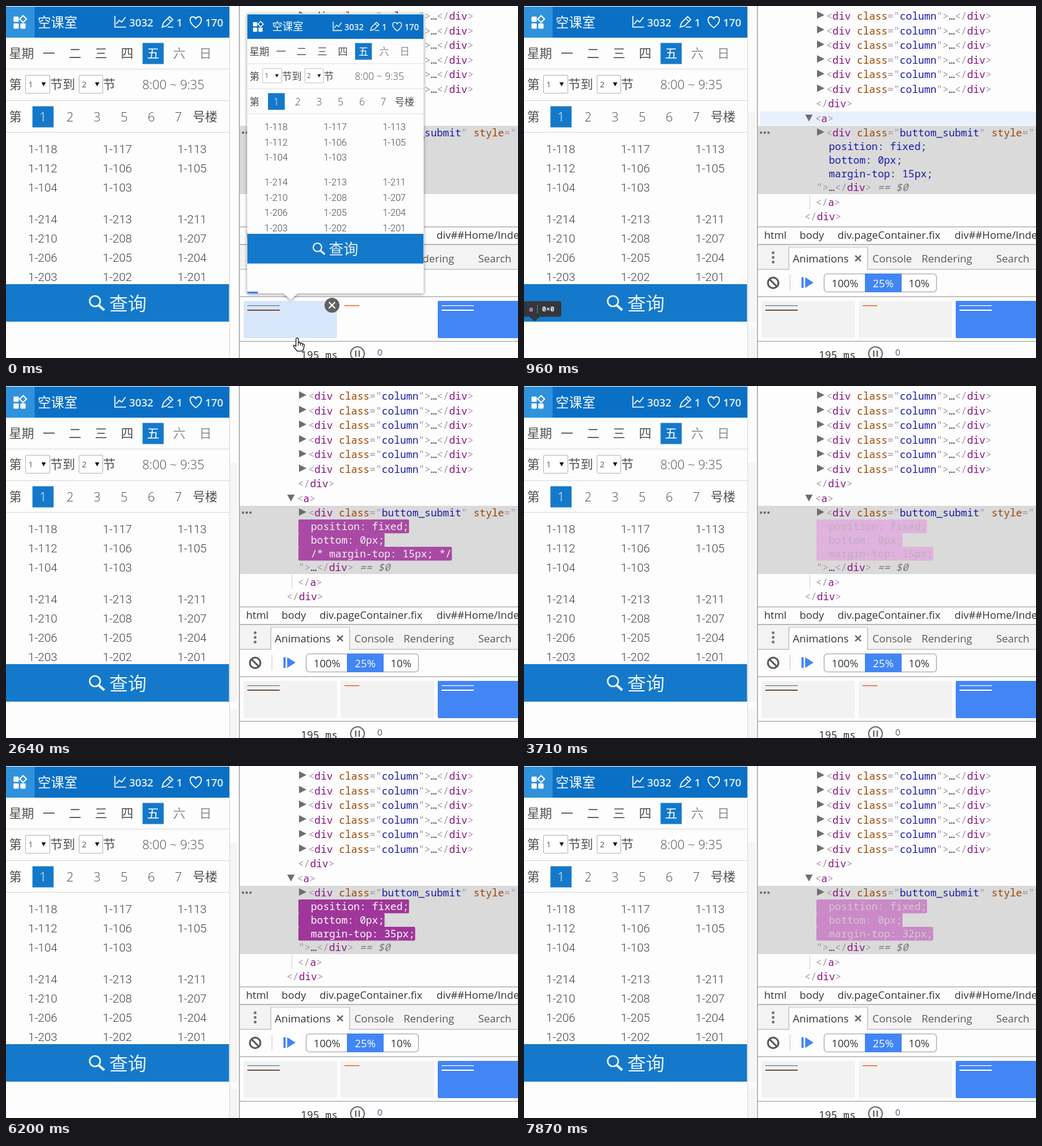
Write an HTML page with a canvas that moves like this. It is 823 by 567 pixels and loops after 7990 ms.

```html
<!DOCTYPE html>
<html lang="zh">
<head>
<meta charset="utf-8">
<title>Style editing</title>
<style>
html, body { margin: 0; width: 100%; height: 100%; overflow: hidden; background: #fff; }
canvas { display: block; }
</style>
</head>
<body>
<canvas id="stage" width="823" height="567"></canvas>
<script>
const ctx = document.getElementById('stage').getContext('2d');
const LOOP = 7990;
const UI = '"Open Sans", "Noto Sans", sans-serif';
const CJK = '"Open Sans", "Noto Sans CJK SC", "Noto Sans CJK", sans-serif';
const MONO = '16.4px "Noto Sans Mono", "DejaVu Sans Mono", monospace';
const BLUE = '#4285f4';
const PAGE_BLUE = '#1479ca';
const TAG = '#881280', ATTR = '#994500', VALUE = '#1a1aa6', PUNCT = '#a894a6';

// Drawing helpers

function rect(x, y, w, h, color) {
  ctx.fillStyle = color;
  ctx.fillRect(x, y, w, h);
}

function round(x, y, w, h, r, fill, stroke, width = 1) {
  ctx.beginPath();
  ctx.roundRect(x, y, w, h, r);
  if (fill) { ctx.fillStyle = fill; ctx.fill(); }
  if (stroke) { ctx.strokeStyle = stroke; ctx.lineWidth = width; ctx.stroke(); }
}

function trace(points, close) {
  ctx.beginPath();
  points.forEach(([x, y]) => ctx.lineTo(x, y));
  if (close) ctx.closePath();
}

function poly(points, color) {
  trace(points, true);
  ctx.fillStyle = color;
  ctx.fill();
}

function line(points, color, width = 1, close = false) {
  trace(points, close);
  ctx.strokeStyle = color;
  ctx.lineWidth = width;
  ctx.stroke();
}

function circle(x, y, r, fill, stroke, width) {
  ctx.beginPath();
  ctx.arc(x, y, r, 0, Math.PI * 2);
  if (fill) { ctx.fillStyle = fill; ctx.fill(); }
  if (stroke) { ctx.strokeStyle = stroke; ctx.lineWidth = width; ctx.stroke(); }
}

function text(str, x, y, font, color, align = 'left') {
  ctx.font = font;
  ctx.fillStyle = color;
  ctx.textAlign = align;
  ctx.fillText(str, x, y);
}

const baseline = mid => Math.round(mid + 5.9);

// Parts alternate between text and colour.
function code(x, mid, ...parts) {
  for (let i = 0; i < parts.length; i += 2) {
    text(parts[i], x, baseline(mid), MONO, parts[i + 1]);
    x += ctx.measureText(parts[i]).width;
  }
  return x;
}

function closeTag(x, mid, name) {
  return code(x, mid, '</', PUNCT, name, TAG, '>', PUNCT);
}

// Phone page

function headerIcons(inPopup) {
  if (!inPopup) rect(0, 1, 46, 50, '#3092dd');
  [[12, 17], [12, 28], [23, 28]].forEach(([x, y]) => round(x, y, 8.5, 8.5, 1.5, '#fff'));
  line([[27.5, 15.5], [33, 21], [27.5, 26.5], [22, 21]], '#fff', 1.8, true);

  line([[175, 16], [175, 34], [193, 34]], '#fff', 1.6);
  line([[177, 29], [182, 23], [186, 26], [192, 18]], '#fff', 1.6);

  line([[251, 34], [253, 27], [263, 17], [268, 22], [258, 32]], '#fff', 1.6, true);
  line([[260, 20], [265, 25]], '#fff', 1.3);
  line([[260, 34], [269, 34]], '#fff', 1.5);

  ctx.beginPath();
  ctx.moveTo(305, 35);
  ctx.bezierCurveTo(299, 30, 296, 27, 296, 22.5);
  ctx.bezierCurveTo(296, 16, 303, 16, 305, 20.5);
  ctx.bezierCurveTo(307, 16, 314, 16, 314, 22.5);
  ctx.bezierCurveTo(314, 27, 311, 30, 305, 35);
  ctx.strokeStyle = '#fff';
  ctx.lineWidth = 1.7;
  ctx.stroke();
}

function select(x, w, value) {
  round(x + .5, 111.5, w, 29, 1, '#fff', '#b4b4b4');
  text(value, x + 5, 131, `13px ${UI}`, '#555');
  poly([[x + 26, 123], [x + 33, 123], [x + 29.5, 129.5]], '#111');
}

function page(inPopup) {
  const body = `300 20px ${CJK}`;
  const count = `600 17px ${UI}`;
  const dark = '#505050';
  const pale = '#e9f3fb';
  rect(0, 1, 359, 566, '#fdfdfd');
  rect(0, 1, 359, 50, '#0a70c5');
  headerIcons(inPopup);
  text('空课室', 51, 34, `21.2px ${CJK}`, '#fff');
  text('3032', 198, 33, count, pale);
  text('1', 274, 33, count, pale);
  text('170', 320, 33, count, pale);

  [101, 152, 203].forEach(y => rect(0, y, 359, 1, '#d8d8d8'));

  text('星期', 5, 84, body, dark);
  rect(219.5, 59.5, 34, 34, PAGE_BLUE);
  [...'一二三四五六日'].forEach((day, i) =>
    text(day, 69 + i * 41.9, 84, body, i === 4 ? '#fff' : i > 4 ? '#8c8c8c' : dark, 'center'));

  text('第', 5, 134, body, dark);
  select(31, 39, '1');
  text('节到', 71, 134, body, dark);
  select(117, 38, '2');
  text('节', 156, 134, body, dark);
  text('8:00 ~ 9:35', 269, 134, body, dark, 'center');

  text('第', 5, 186, body, dark);
  rect(42.5, 161.5, 34, 34, PAGE_BLUE);
  [...'123567'].forEach((n, i) =>
    text(n, 59.5 + i * 43.5, 186, body, i ? dark : '#fff', 'center'));
  text('号楼', 300, 186, body, dark);

  const rooms = [
    [230, 118, 117, 113], [261, 112, 106, 105], [292, 104, 103],
    [343, 214, 213, 211], [374, 210, 208, 207], [405, 206, 205, 204], [436, 203, 202, 201]
  ];
  rooms.forEach(([y, ...row]) => row.forEach((n, i) =>
    text('1-' + n, 59 + i * 120, y + 7, '300 18.8px Roboto, "Open Sans", sans-serif', '#444', 'center')));

  rect(0, 448, 358.5, 60.5, PAGE_BLUE);
  circle(143, 475.5, 8.5, null, pale, 2.6);
  line([[149, 482], [158, 490]], pale, 4);
  text('查询', 166, 490, `300 30px ${CJK}`, pale);
}

// Highlight of freshly edited attributes

function ease(x) {
  const bez = (a, b, u) => 3 * a * u * (1 - u) ** 2 + 3 * b * u * u * (1 - u) + u ** 3;
  let lo = 0, hi = 1;
  for (let i = 0; i < 20; i++) {
    const mid = (lo + hi) / 2;
    if (bez(.25, .25, mid) < x) lo = mid; else hi = mid;
  }
  return bez(.1, 1, lo);
}

function mix(a, b, k) {
  return `rgb(${a.map((v, i) => Math.round(v + (b[i] - v) * k)).join(',')})`;
}

function flash(age) {
  const p = age / 1400;
  if (p >= 1) return { ink: VALUE, back: null };
  const pale = [245, 219, 244], grey = [168, 148, 166];
  if (p < .8) {
    const k = ease(p / .8);
    return { ink: mix([255, 255, 255], grey, k), back: mix([158, 54, 153], pale, k) };
  }
  const k = ease((p - .8) / .2);
  return { ink: mix(grey, [26, 26, 166], k), back: mix(pale, [218, 218, 218], k) };
}

// A held key: one press, a pause, then steady repeats.
const DELAY = 335, REPEAT = 27;

function hold(t, from, limit) {
  const late = t - from - DELAY;
  const count = late < 0 ? 1 : Math.min(limit, 2 + Math.floor(late / REPEAT));
  const last = count < 2 ? from : from + DELAY + (count - 2) * REPEAT;
  return { count, last };
}

function edit(t) {
  if (t < 2640) return { rule: 'margin-top: 15px;', since: -2000 };
  if (t < 3290) return { rule: '/* margin-top: 15px; */', since: 2510 };
  if (t < 5300) return { rule: 'margin-top: 15px;', since: 3200 };
  const down = t >= 6745;
  const { count, last } = down ? hold(t, 6745, 19) : hold(t, 5300, 36);
  return { rule: `margin-top: ${down ? 51 - count : 15 + count}px;`, since: last };
}

// Developer tools

function rightArrow(x, y) {
  poly([[x, y - 6], [x + 12, y], [x, y + 6]], '#6e6e6e');
}

function elements(t) {
  for (let i = 0; i < 6; i++) {
    const y = 16 + i * 23.6;
    rightArrow(471, y - 1.5);
    const x = code(486, y, '<', PUNCT, 'div', TAG, ' class', ATTR, '="', PUNCT,
      'column', VALUE, '">', PUNCT, '…', '#333');
    closeTag(x, y, 'div');
  }
  closeTag(469, 157, 'div');

  if (t >= 780 && t < 1020) round(379, 170, 450, 22, 4, '#e8f0fb');
  poly([[452, 175], [464, 175], [458, 186]], '#6e6e6e');
  code(468, 181, '<', PUNCT, 'a', TAG, '>', PUNCT);

  rect(376, 193, 447, 110, '#dadada');
  [381, 387, 393].forEach(x => circle(x, 204, 1.9, '#666'));
  rightArrow(471, 203);
  code(486, 204, '<', PUNCT, 'div', TAG, ' class', ATTR, '="', PUNCT,
    'buttom_submit', VALUE, '"', PUNCT, ' style', ATTR, '="', PUNCT);

  const { rule, since } = edit(t);
  const { ink, back } = flash(t - since);
  ['position: fixed;', 'bottom: 0px;', rule].forEach((str, i) => {
    const y = 226 + i * 22;
    ctx.font = MONO;
    if (back) round(470, y - 11, 20.5 + ctx.measureText(str).width, 22.3, 2, back);
    code(490, y, str, ink);
  });

  const x = code(470, 292, '">', PUNCT, '…', '#333');
  const end = closeTag(x, 292, 'div');
  text(' == $0', end, baseline(292), 'italic ' + MONO, '#777');

  rect(459, 304, 1, 23, '#d4d4d4');
  closeTag(469, 316, 'a');
  closeTag(451, 339, 'div');
}

function crumbsAndTabs() {
  const small = `16.8px ${UI}`, tab = `17px ${UI}`;
  rect(376, 355, 447, 1.5, '#b4b4b4');
  text('html', 386, 375, small, '#333');
  text('body', 443, 375, small, '#333');
  text('div.pageContainer.fix', 504, 375, small, '#333');
  text('div##Home/Index', 692, 375, small, '#333');

  rect(376, 384, 447, 40, '#f3f3f3');
  rect(376, 383.5, 447, 1.5, '#a8a8a8');
  rect(376, 423.5, 447, 1.5, '#c4c4c4');
  [397.5, 405, 412.5].forEach(y => circle(400.5, y, 2.2, '#6e6e6e'));
  rect(425, 388, 128, 37, '#c4c4c4');
  rect(426.5, 389, 125, 36, '#fdfdfd');
  text('Animations', 432, 413, tab, '#333');
  line([[532.5, 402], [541.5, 411]], '#666', 2.4);
  line([[541.5, 402], [532.5, 411]], '#666', 2.4);
  text('Console', 560, 413, tab, '#5a5a5a');
  text('Rendering', 639, 413, tab, '#5a5a5a');
  text('Search', 759, 413, tab, '#5a5a5a');
}

function animationsPanel(t) {
  const popup = t < POPUP_END;
  circle(400.5, 446, 8.5, null, '#5a5a5a', 3);
  line([[394.5, 440], [406.5, 452]], '#5a5a5a', 3);
  rect(427, 433, 1, 25, '#ccc');
  rect(446, 437, 3.5, 17, BLUE);
  poly([[452, 437], [465.5, 445.5], [452, 454]], BLUE);

  round(482.5, 431.5, 180.5, 29, 5, '#fff', '#b8b8b8', 1.6);
  rect(548, 431, 59, 30, BLUE);
  ['100%', '25%', '10%'].forEach((label, i) =>
    text(label, [516, 577.5, 635][i], 453, `17px ${UI}`, i === 1 ? '#fff' : '#333', 'center'));

  rect(376, 467.5, 447, 1.5, '#b4b4b4');
  round(382, 475, 150, 60, 2, popup ? '#d8e6fc' : '#f2f2f2');
  rect(388, 482, 52, 1.2, '#607d8b');
  rect(388, 489, 52, 2, '#795548');
  if (!popup) round(538, 475, 150, 60, 2, '#f2f2f2');
  rect(544, 482, 24, 1.4, '#ff5722');
  round(694, 475, 150, 60, 2, BLUE);
  rect(700, 482, 52, 1.2, '#fff');
  rect(700, 489, 52, 2, '#fff');

  rect(376, 539.5, 447, 1.5, '#b4b4b4');
  text('195 ms', 474, 568, MONO, '#333');
  circle(565, 560, 11, null, '#6e6e6e', 2);
  rect(561, 555, 2.4, 10, '#6e6e6e');
  rect(566.6, 555, 2.4, 10, '#6e6e6e');
  text('0', 601, 563, `14.5px ${UI}`, '#4a6078', 'center');
}

// Replay preview above the first animation group
const POPUP_END = 330;

function preview(t) {
  ctx.save();
  ctx.shadowColor = 'rgba(0,0,0,.45)';
  ctx.shadowBlur = 5;
  ctx.shadowOffsetY = 1;
  ctx.beginPath();
  ctx.roundRect(387.5, 12, 284, 451, 2);
  ctx.moveTo(446, 463);
  ctx.lineTo(457.5, 473.5);
  ctx.lineTo(469, 463);
  ctx.fillStyle = '#fdfdfd';
  ctx.fill();
  ctx.restore();

  ctx.save();
  ctx.beginPath();
  ctx.rect(388, 12, 283, 451);
  ctx.clip();
  ctx.translate(387.5, 12.6);
  ctx.scale(.791, .791);
  page(true);
  ctx.restore();
  rect(388, 460, 17 + t * .36, 3, BLUE);

  circle(524, 482, 12, '#606060');
  line([[519, 477], [529, 487]], '#fff', 2);
  line([[529, 477], [519, 487]], '#fff', 2);
}

function hand(t) {
  const k = Math.max(0, t - 60) / 780;
  ctx.save();
  ctx.translate(468 + 20 * k, 535 - 355 * k * k * (3 - 2 * k));
  ctx.scale(.95, .95);
  ctx.lineJoin = 'round';
  ctx.beginPath();
  ctx.moveTo(-2, 14);
  ctx.lineTo(-2, 1);
  ctx.quadraticCurveTo(0, -2, 2, 1);
  ctx.lineTo(2, 8);
  ctx.quadraticCurveTo(4, 6, 5.5, 9);
  ctx.quadraticCurveTo(7.5, 7, 9, 10);
  ctx.quadraticCurveTo(12, 9, 12, 12);
  ctx.lineTo(11, 18);
  ctx.lineTo(9, 22);
  ctx.lineTo(0, 22);
  ctx.lineTo(-6, 14);
  ctx.quadraticCurveTo(-7, 10, -2, 14);
  ctx.closePath();
  ctx.fillStyle = '#fff';
  ctx.strokeStyle = '#111';
  ctx.lineWidth = 1.3;
  ctx.fill();
  ctx.stroke();
  line([[2, 8], [2, 13]], '#111', 1.1);
  line([[5.5, 9], [5.5, 13]], '#111', 1.1);
  line([[9, 10], [9, 14]], '#111', 1.1);
  ctx.restore();
}

function inspectorTip() {
  const font = 'bold 11px "Noto Sans Mono", "DejaVu Sans Mono", monospace';
  round(-3, 475.5, 63, 25, 3, '#33383d');
  poly([[8, 500], [26, 500], [17, 508]], '#33383d');
  text('a', 8, 492, font, '#e39ae3');
  rect(21, 481, 1, 14, '#727880');
  text('0×0', 29, 492, font, '#eee');
}

function draw(t) {
  rect(0, 0, 823, 567, '#fdfdfd');
  page(false);
  rect(359, 0, 1, 567, '#d9d9d9');
  if (t >= 840) {
    const top = t < 1020 ? 170 : 123;
    rect(360, top, 12, 509 - top, '#f5f5f5');
    rect(360, 520, 12, 47, '#f5f5f5');
  }
  rect(374.5, 0, 1.5, 567, '#a6a6a6');
  elements(t);
  crumbsAndTabs();
  animationsPanel(t);
  if (t < POPUP_END) preview(t);
  if (t < 840) hand(t);
  if (t >= 780 && t < 1020) inspectorTip();
}

const BURSTS = [
  [60, 840, 15], [900, 1080, 4], [2640, 2930, 5], [3110, 3110, 1], [3290, 3710, 6],
  [3890, 3890, 1], [4190, 4190, 1], [4370, 4610, 4], [5300, 6080, 14],
  [6140, 6920, 13], [7040, 7810, 13], [7870, 7870, 1]
];

function refreshTime(t) {
  let last = 0;
  for (const [from, to, count] of BURSTS) {
    if (t < from) break;
    const step = (to - from) / Math.max(1, count - 1);
    last = t >= to ? to : from + Math.floor((t - from) / step) * step;
  }
  return last;
}

const start = performance.now();

function tick() {
  draw(refreshTime((performance.now() - start) % LOOP));
  requestAnimationFrame(tick);
}
tick();
</script>
</body>
</html>
```
